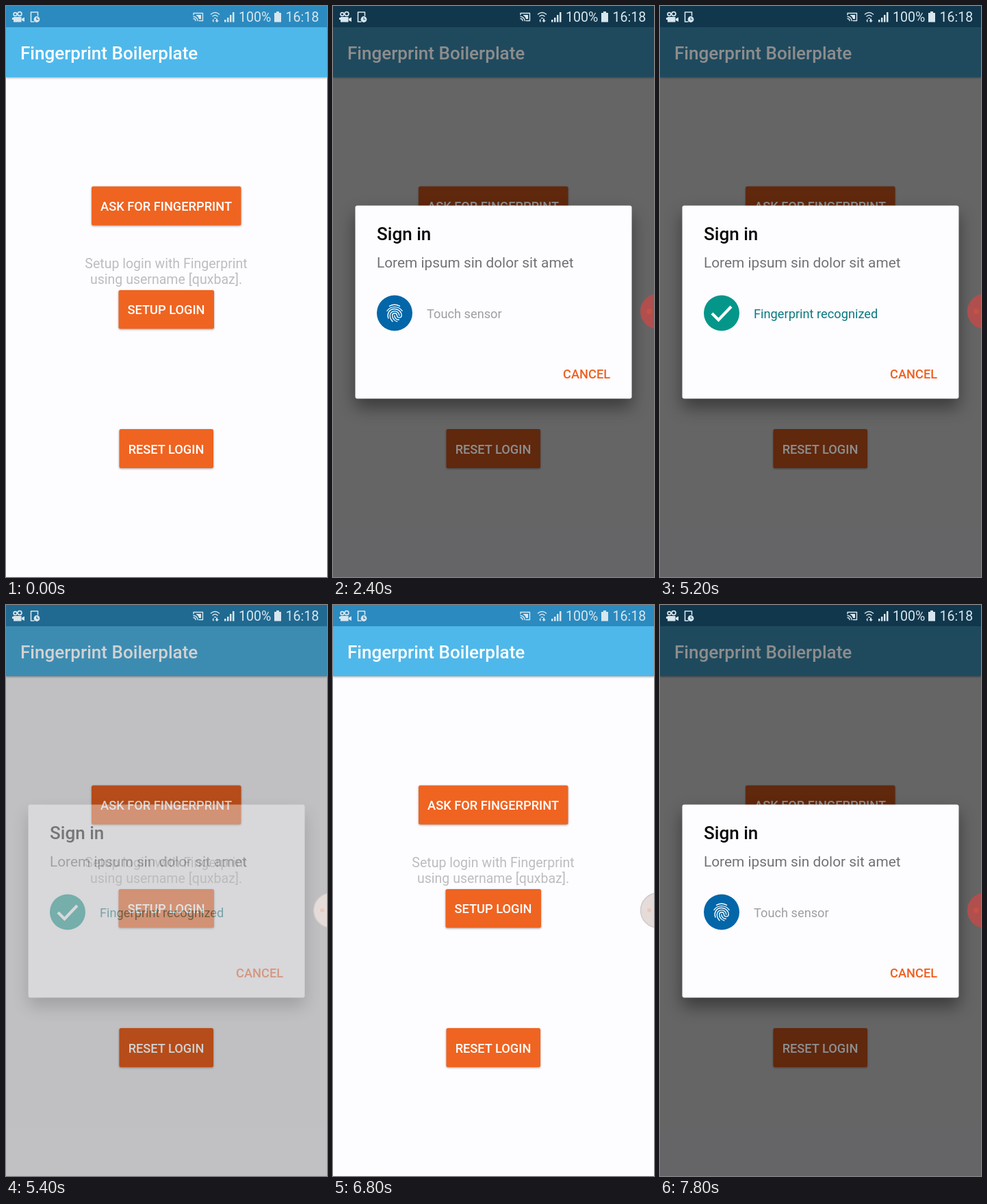
An HTML page for the animation above (8000 ms loop, 469 px wide and 834 px high).

```html
<!DOCTYPE html>
<html lang="en">
<head>
<meta charset="utf-8">
<title>Fingerprint login</title>
<style>
  html, body { margin: 0; width: 100%; height: 100%; overflow: hidden; background: #fdfcff; }
  svg { display: block; width: 100vw; height: 100vh; font-family: Roboto, sans-serif; }
  .medium { font-weight: 500; }
  .button { font-size: 18.24px; }
  .title { font-size: 26.05px; }
  .middle { text-anchor: middle; }
  .raised { filter: drop-shadow(0 1.5px 1.5px rgba(0, 0, 0, .35)); }
  .floating { filter: drop-shadow(0 13px 12px rgba(0, 0, 0, .42)); }
  .line { fill: none; stroke-linecap: round; stroke-linejoin: round; }

  .scrim, .dialog, .touch, .done, .idle, .active {
    animation: 8s step-end infinite;
  }
  .scrim { animation-name: scrim; }
  .dialog { animation-name: dialog; }
  .touch { animation-name: touch; }
  .done { animation-name: done; }
  .idle { animation-name: idle; }
  .active { animation-name: active; }

  @keyframes scrim {
    0%, 70% { opacity: 0; }
    7.5%, 87.5% { opacity: .88; }
    10%, 90%, 100% { opacity: 1; }
    67.5% { opacity: .4; }
  }
  @keyframes dialog {
    0%, 70% { opacity: 0; }
    7.5%, 87.5% { opacity: .97; }
    10%, 90%, 100% { opacity: 1; }
    67.5% { opacity: .4; }
  }
  @keyframes touch {
    0%, 70%, 100% { opacity: 1; }
    50% { opacity: 0; }
  }
  @keyframes done {
    0%, 70%, 100% { opacity: 0; }
    50% { opacity: 1; }
  }
  @keyframes idle {
    0%, 87.5%, 100% { opacity: 0; }
    67.5% { opacity: 1; }
  }
  @keyframes active {
    0%, 67.5% { opacity: 0; }
    7.5%, 87.5%, 100% { opacity: 1; }
  }
</style>
</head>
<body>
<svg viewBox="0 0 469 834" preserveAspectRatio="none">
  <defs>
    <g id="labels" class="medium" fill="#fff">
      <text class="title" x="21" y="78">Fingerprint Boilerplate</text>
      <g class="button middle">
        <text x="234" y="299">ASK FOR FINGERPRINT</text>
        <text x="234" y="450">SETUP LOGIN</text>
        <text x="234" y="654">RESET LOGIN</text>
      </g>
    </g>
  </defs>

  <!-- App screen -->
  <rect width="469" height="834" fill="#fdfcff"/>
  <rect class="raised" y="31" width="469" height="73" fill="#4fb8ea"/>
  <rect width="469" height="31" fill="#2b8abf"/>
  <g class="raised" fill="#ef6421">
    <rect x="125" y="263.5" width="218.5" height="57" rx="2.5"/>
    <rect x="164.5" y="415" width="139.5" height="56.5" rx="2.5"/>
    <rect x="165.5" y="618" width="137.5" height="57" rx="2.5"/>
  </g>
  <g class="middle" font-size="19.54" fill="#bdbcbf">
    <text x="234" y="383">Setup login with Fingerprint</text>
    <text x="234" y="406">using username [quxbaz].</text>
  </g>
  <use href="#labels"/>

  <!-- Dimming, with the labels kept readable -->
  <g class="scrim">
    <rect width="469" height="834" fill="#000" fill-opacity=".6"/>
    <use href="#labels" opacity=".25"/>
  </g>

  <!-- Status bar -->
  <g fill="#d8e6ee" stroke="#d8e6ee" stroke-width="0">
    <circle cx="13.5" cy="12" r="2.4" fill="none" stroke-width="1.7"/>
    <circle cx="20" cy="11.5" r="2.9" fill="none" stroke-width="1.7"/>
    <path d="M11 16H22.5V23.5H11ZM23 18.5L27 16.5V23L23 21ZM9 17H11V20H9Z"/>
    <path class="line" d="M41 23H36.5V9H46.5V14" stroke-width="1.6"/>
    <circle cx="45" cy="19.5" r="4.4"/>
    <path class="line" d="M45 17V19.7H47" stroke="#23658a" stroke-width="1.1"/>
    <path class="line" d="M274 13V10.5H287.5V21.5H282M274 15.5A6 6 0 0 1 280 21.5M274 18.5A3 3 0 0 1 277 21.5" stroke-width="1.4"/>
    <path d="M278 13H285V19H282Q281 15 278 14Z"/>
    <path class="line" d="M299.5 12Q305.5 7 311.5 12M302 15Q305.5 12 309 15" stroke-width="1.6"/>
    <path d="M303.5 17H307.5L305.5 19ZM301.5 21L303.5 18.5V23.5H302.5ZM307 18.5H309V21H311L308 24L305.5 21H307Z"/>
    <path d="M319 20H321.5V23.5H319ZM323 17H325.5V23.5H323ZM327 13H329.5V23.5H327ZM331 9H333.5V23.5H331Z"/>
    <path d="M392 10H395V8H399V10H402V23.5H392Z"/>
    <g font-size="19.6">
      <text x="340" y="23">100%</text>
      <text x="408.5" y="23">16:18</text>
    </g>
  </g>

  <!-- Dialog -->
  <g class="dialog">
    <rect class="floating" x="32.5" y="291.5" width="404" height="282" rx="3" fill="#fdfcff"/>
    <text class="title medium" x="64" y="342" fill="#080808">Sign in</text>
    <text x="64" y="382" font-size="20.85" fill="#737174">Lorem ipsum sin dolor sit amet</text>
    <text class="button medium" x="336" y="544" fill="#ef5f1f">CANCEL</text>
    <g class="touch">
      <circle cx="90" cy="448.5" r="26" fill="#0266a8"/>
      <path class="line" transform="translate(74.4 432.9) scale(1.3)" stroke="#fff" stroke-width="1.05"
        d="M6.2 4.2Q12 1 17.8 4.2M3.5 9.6C5.5 6.7 8.6 5.2 12 5.2S18.5 6.7 20.5 9.6
           M9.7 21.4C8.9 20.6 8.4 20 7.8 18.8C7.2 17.6 6.8 16.2 6.8 14.7C6.8 12 9.1 9.8 12 9.8S17.2 12 17.2 14.7
           M16.9 19.5C13.8 19.7 11.9 17.3 11.9 14.7
           M14.9 21.5C13.4 21.1 12.5 20.6 11.5 19.6C10.2 18.3 9.4 16.5 9.4 14.7C9.4 13.3 10.6 12.2 12.1 12.2S14.7 13.3 14.7 14.7S15.9 17.1 17.3 17.1S19.8 16 19.8 14.7C19.8 10.6 16.3 7.4 12 7.4C9 7.4 6.2 9 5 11.7C4.2 13.4 4.3 15.8 5 17.9"/>
      <text class="button" x="137" y="456" fill="#a09ea1">Touch sensor</text>
    </g>
    <g class="done">
      <circle cx="90" cy="448.5" r="26" fill="#05968a"/>
      <path d="M76 449L85.5 458.5L104 439" fill="none" stroke="#fff" stroke-width="4.2"/>
      <text class="button" x="137" y="456" fill="#087a80">Fingerprint recognized</text>
    </g>
  </g>

  <!-- Floating record button -->
  <g class="idle">
    <circle cx="475" cy="446" r="25.5" fill="#e5dcda" stroke="#cfc9c9" stroke-width="1.5"/>
    <circle cx="462" cy="446" r="3" fill="#ebc8bd"/>
  </g>
  <g class="active">
    <circle cx="475" cy="446" r="26" fill="#b04f4e"/>
    <circle cx="462" cy="446" r="4" fill="#c45343"/>
  </g>
</svg>
</body>
</html>
```
